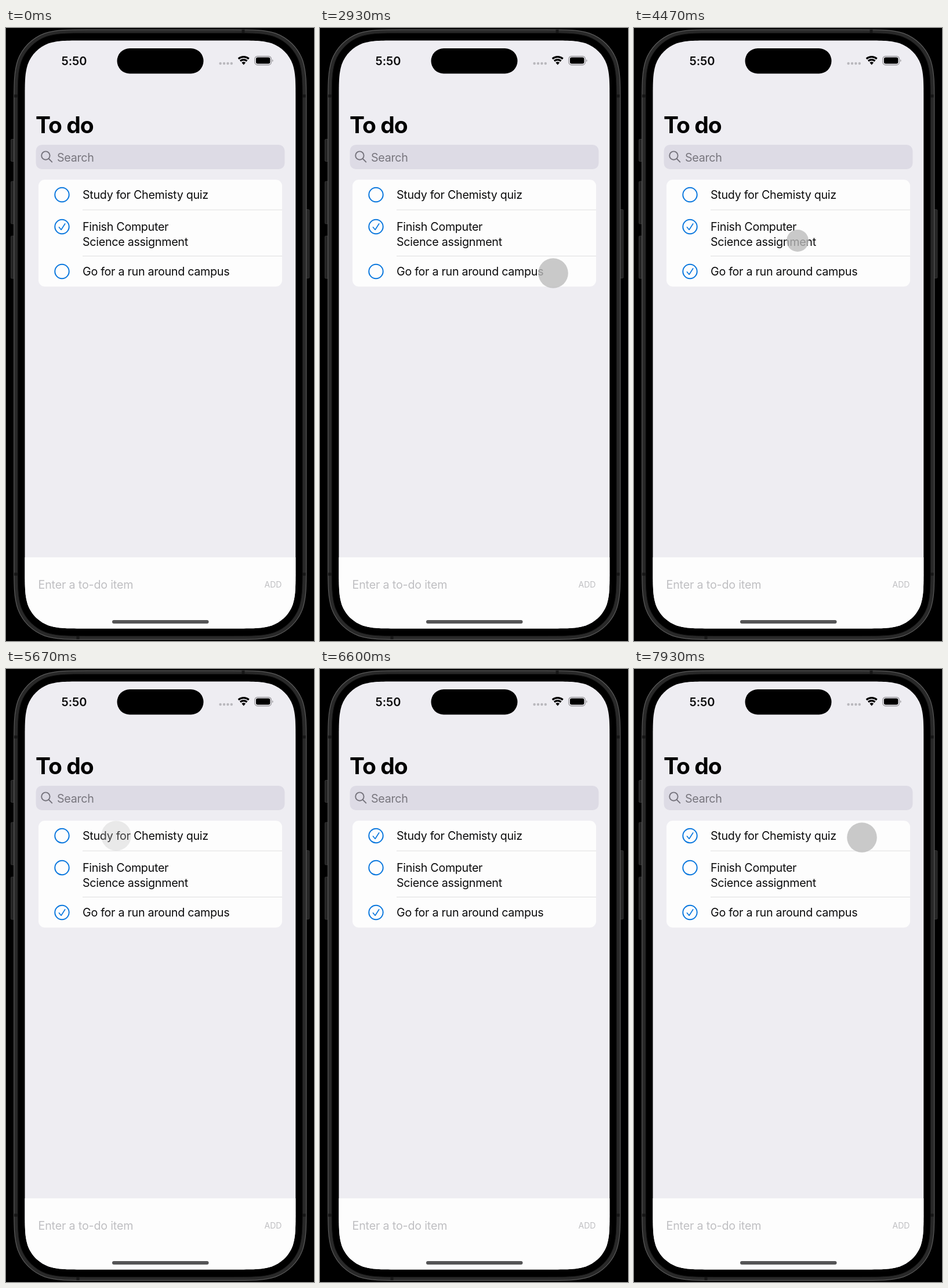
Recreate the animation shown at these times as an HTML page. Size 531 by 1055 pixels, loop 8 s.

```html
<!DOCTYPE html>
<html lang="en">
<head>
<meta charset="utf-8">
<title>To do</title>
<style>
  html, body { margin: 0; width: 100%; height: 100%; overflow: hidden; background: #000; }
  svg { display: block; width: 531px; height: 1055px; }
  text { font: 19.7px Inter, "Open Sans", sans-serif; font-optical-sizing: none; letter-spacing: -.015em; fill: #0b0b0c; }
  .title { font-size: 39px; font-weight: 700; letter-spacing: -1px; fill: #000; }
  .clock { font-size: 20px; font-weight: 600; letter-spacing: -.1px; }
  .search { fill: #77757d; }
  .hint { fill: #bfbfc2; letter-spacing: -.009em; }
  .add { font-size: 14px; letter-spacing: 0; }
  .box { fill: none; stroke: #0b78de; stroke-width: 2; }
  .tick { stroke-width: 1.7; stroke-linecap: round; stroke-linejoin: round; }
</style>
</head>
<body>
<svg viewBox="0 0 531 1055">
  <rect width="531" height="1055" fill="#000"/>

  <!-- Phone body -->
  <g fill="#242424" stroke="#3c3c3c" stroke-width=".8">
    <rect x="8.5" y="191.5" width="7" height="38" rx="1.5"/>
    <rect x="8.5" y="264" width="7" height="73" rx="1.5"/>
    <rect x="8.5" y="358" width="7" height="73" rx="1.5"/>
    <rect x="516" y="312.5" width="7" height="118" rx="1.5"/>
  </g>
  <path id="body" fill="#292929" stroke="#5a5a5a" stroke-width="1.2"/>
  <path d="M14 117h6M511 117h6M14 940h6M511 940h6M409 3v6M124 1046v6" stroke="#171717" stroke-width="5"/>
  <path id="bezel" fill="#000" stroke="#161616"/>

  <!-- Screen -->
  <clipPath id="clip"><path id="screen"/></clipPath>
  <g clip-path="url(#clip)">
    <rect x="32" y="21" width="468" height="1014" fill="#eeedf2"/>
    <rect x="32" y="911" width="468" height="124" fill="#fdfdfd"/>
  </g>
  <rect x="191.5" y="35" width="149" height="43.5" rx="21.75" fill="#000"/>
  <text class="clock" x="95.6" y="63.5">5:50</text>
  <g fill="#b9b8bd">
    <circle cx="369.6" cy="61" r="2.2"/><circle cx="376" cy="61" r="2.2"/>
    <circle cx="382.4" cy="61" r="2.2"/><circle cx="388.8" cy="61" r="2.2"/>
  </g>
  <g transform="translate(409.7 63.6)" fill="none" stroke="#000" stroke-width="3.2">
    <path d="M-9 -10.7A14 14 0 0 1 9 -10.7M-5.8 -6.9A9 9 0 0 1 5.8 -6.9"/>
    <path d="M-3.4 -4A5.2 5.2 0 0 1 3.4 -4L0 0z" fill="#000" stroke="none"/>
  </g>
  <rect x="428.8" y="48.6" width="28.6" height="15" rx="4.8" fill="none" stroke="#8d8c90" stroke-width="1.1"/>
  <rect x="430.9" y="50.6" width="24.5" height="11" rx="3"/>
  <path d="M459 53.7q3.2 2.4 0 4.8z" fill="#99989c"/>

  <text class="title" x="51" y="180.5">To do</text>
  <rect x="51.5" y="201" width="429" height="42" rx="10.5" fill="#dddbe5"/>
  <g fill="none" stroke="#75737c" stroke-width="1.9" stroke-linecap="round">
    <circle cx="68.4" cy="219.6" r="7.2"/><path d="M73.7 225l5.6 5.6"/>
  </g>
  <text class="search" x="88" y="229.5">Search</text>

  <rect x="56" y="261" width="420" height="184" rx="11" fill="#fdfdfd"/>
  <path d="M132 313h344M132 392.5h344" stroke="#dededf"/>
  <g id="boxes"></g>
  <text x="132" y="294">Study for Chemisty quiz</text>
  <text x="132" y="349">Finish Computer</text>
  <text x="132" y="375">Science assignment</text>
  <text x="132" y="426">Go for a run around campus</text>

  <text class="hint" x="55.5" y="965">Enter a to-do item</text>
  <text class="hint add" x="445.5" y="962.5">ADD</text>
  <rect x="183" y="1019" width="166.5" height="6" rx="3" fill="#555556"/>
  <circle id="touch" fill="#bbb"/>
</svg>
<script>
const LOOP = 8000, TOGGLE_DELAY = 395, RADIUS = 25.8;
const startsDone = [false, true, false];
const byId = id => document.getElementById(id);
const touch = byId("touch"), boxes = byId("boxes");

// Rectangle whose corners ease into the sides instead of being circular arcs.
function smoothRect(x, y, w, h, r) {
  const corner = [[1.528, 0], [1.088, 0], [.868, 0], [.631, .075], [.373, .169],
                  [.169, .373], [.075, .631], [0, .868], [0, 1.088], [0, 1.528]];
  const place = (points, right, bottom) => points.map(([u, v]) =>
    [right ? x + w - u * r : x + u * r, bottom ? y + h - v * r : y + v * r].join(" "));
  const back = [...corner].reverse();
  const curves = [place(corner, false, false), place(back, false, true),
                  place(corner, true, true), place(back, true, false)];
  return "M" + curves.map(([first, ...rest]) => first + "C" + rest.join(" ")).join("L") + "z";
}
byId("body").setAttribute("d", smoothRect(13.8, 2.8, 504, 1049.6, 84));
byId("bezel").setAttribute("d", smoothRect(20.2, 8.8, 491, 1037.6, 78));
byId("screen").setAttribute("d", smoothRect(32.5, 21.4, 466.8, 1012, 65.4));

const ticks = [287, 342, 419].map(y => {
  boxes.insertAdjacentHTML("beforeend",
    `<circle class="box" cx="96.5" cy="${y}" r="12.2"/>
     <path class="box tick" d="M91.4 ${y + .8}l3.7 4.4l6.6 -10.2"/>`);
  return boxes.lastElementChild;
});

// Pointer slows down along its path while held.
function drift(path, progress) {
  const p = Math.min(1, Math.max(0, progress));
  const along = (1 - (1 - p) ** 2) * (path.length - 1);
  const i = Math.min(Math.floor(along), path.length - 1);
  const [x, y] = path[i], [nx, ny] = path[i + 1] || path[i];
  const k = along - i;
  return [x + (nx - x) * k, y + (ny - y) * k];
}

// Each press has a start time, the row it toggles and the points it drifts through.
const presses = [
  { at: 2600, row: 2, path: [[402, 422]] },
  { at: 4400, row: 1, path: [[282, 366]] },
  { at: 5670, row: 0, path: [[190, 287], [174.5, 289.5]] },
  { at: 7130, row: null, path: [[376, 286], [399, 288], [393, 290]] }
];

// Faint on contact, a quick squeeze, held, then faint before release.
function pressLook(age) {
  if (age < 60) return { r: RADIUS, opacity: .3 };
  if (age < 125) return { r: 19, opacity: .78 };
  if (age < 862) return { r: RADIUS, opacity: .78 };
  return { r: RADIUS, opacity: .3 };
}

function render(t) {
  const done = [...startsDone];
  for (const p of presses)
    if (p.row !== null && t >= p.at + TOGGLE_DELAY) done[p.row] = !done[p.row];
  ticks.forEach((tick, i) => tick.style.display = done[i] ? "" : "none");

  const press = presses.find(p => t >= p.at && t < p.at + 925);
  touch.style.display = press ? "" : "none";
  if (!press) return;
  const age = t - press.at;
  const [x, y] = drift(press.path, age / 800);
  const look = pressLook(age);
  touch.setAttribute("cx", x);
  touch.setAttribute("cy", y);
  touch.setAttribute("r", look.r);
  touch.setAttribute("opacity", look.opacity);
}

const start = performance.now();
function frame() {
  render((performance.now() - start) % LOOP);
  requestAnimationFrame(frame);
}
frame();
</script>
</body>
</html>
```
